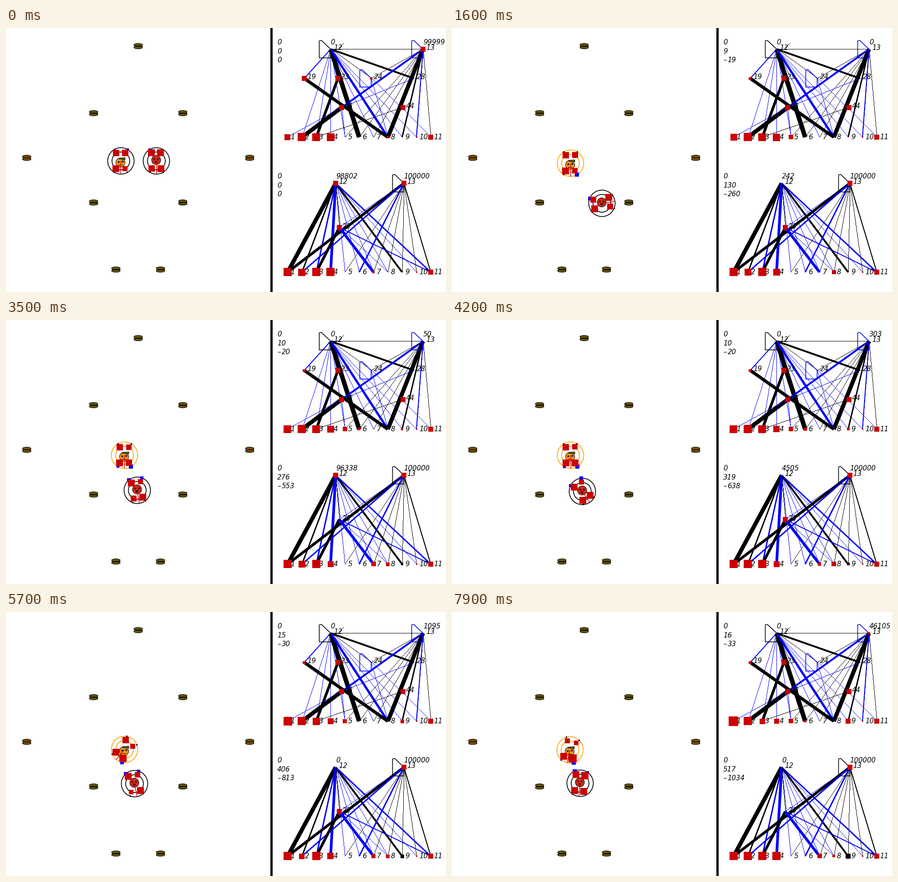
Animation of 967x579 px, one loop 8 s. Source, as a matplotlib script:

```python
import numpy as np
import matplotlib.pyplot as plt
from matplotlib.animation import FuncAnimation
from matplotlib.patches import Circle, Ellipse, Polygon, Rectangle

W, H, DPI = 967, 579, 64
PT = 72 / DPI
RED, BLUE, ORANGE, OLIVE = "#cc0000", "#0000ff", "#ffa500", "#665500"

plt.rcParams["font.family"] = "DejaVu Sans"

fig = plt.figure(figsize=(W / DPI, H / DPI), dpi=DPI, facecolor="white")
ax = fig.add_axes([0, 0, 1, 1])
ax.set_xlim(0, W)
ax.set_ylim(H, 0)
ax.axis("off")

moving = []


def shape(patch, z):
    patch.set_zorder(z)
    return ax.add_patch(patch)


def line(x0, y0, x1, y1, color, width, z=2):
    return ax.plot([x0 + 0.5, x1 + 0.5], [y0 + 0.5, y1 + 0.5], color=color,
                   lw=width * PT, zorder=z, solid_capstyle="butt")[0]


def hairline(x0, y0, x1, y1, color, z=2):
    """A crisp line, one pixel wide, without smoothing."""
    n = int(max(abs(x1 - x0), abs(y1 - y0))) + 1
    xs, ys = np.linspace(x0, x1, n), np.linspace(y0, y1, n)
    return ax.plot(np.floor(xs) + 0.5, np.floor(ys) + 0.5, ",", color=color, zorder=z)[0]


def write(x, y, s):
    return ax.text(x, y, s, fontsize=15 * PT, style="italic", zorder=4,
                   va="baseline", ha="left")


# ---------- static scene ----------
def burger(x, y):
    for dy in (3.5, -2):
        shape(Ellipse((x + 0.5, y + dy), 19, 6.5, fc=OLIVE, ec="black", lw=PT), 2)
    line(x - 9, y, x + 9, y, "black", 2, 3)
    if y == 284:
        line(x - 7, y, x + 7, y, RED, 1, 3)


for dx, dy in [(0, -245), (98, -98), (245, 0), (98, 98), (49, 245)]:
    for side in {dx, -dx}:
        burger(290 + side, 284 + dy)
shape(Rectangle((581, 0), 5, H, color="black", lw=0), 2)


def row(y):
    return {n: (618.5 + 31.45 * (n - 1), y) for n in range(1, 12)}


TOP = row(239) | {12: (713, 46), 13: (916, 46), 19: (655, 110), 23: (729, 110),
                  24: (802, 110), 28: (896, 110), 43: (737, 174), 44: (872, 174)}
LOW = row(535) | {12: (724, 340), 13: (874, 340), 23: (732, 437)}

# start node: {end node: width}; a negative width is a blue link
TOP_LINKS = {12: {13: 1, 28: 4, 19: -2, 23: -4, 24: 1, 6: 10, 8: -5},
             13: {8: 9, 43: -4, 9: 3, 10: -2, 24: 1},
             19: {8: 7}, 23: {3: 6}, 24: {11: -1, 8: -1}, 28: {43: -1},
             43: {2: 9, 1: -1, 5: -1}, 44: {3: 1}}
LOW_LINKS = {12: {1: 9, 2: 3, 3: -3, 4: -6, 9: 4, 11: -3, 23: 1},
             13: {1: 6, 2: -3, 6: -3, 11: 2, 23: -1},
             23: {3: 6, 7: -6, 8: -1, 11: -2}}


def network(nodes, links, first):
    def link(a, b, w):
        color = BLUE if w < 0 else "black"
        ends = (*nodes[a], *nodes[b])
        if abs(w) == 1:
            hairline(*ends, color)
        else:
            line(*ends, color, abs(w))

    # both outputs reach most inputs through faint links
    for n in range(first, 11):
        link(12, n, -1)
    for n in range(5, 12):
        link(13, n, 1)
    for a, ends in links.items():
        for b, w in ends.items():
            link(a, b, w)
    for n, (x, y) in nodes.items():
        write(x + 7, y + (5 if n < 12 else 2.5), str(n))


def loop(x, y, color):
    pts = [(x, y), (x, y + 19), (x - 25, y + 19), (x - 25, y - 18),
           (x - 23, y - 19), (x - 20, y - 19)]
    shape(Polygon(np.array(pts) + 0.5, fill=False, ec=color, lw=1.6 * PT), 2)


network(TOP, TOP_LINKS, 2)
network(LOW, LOW_LINKS, 5)
for spot, color in [(TOP[12], "black"), (TOP[13], BLUE), (TOP[24], BLUE), (LOW[13], "black")]:
    loop(*spot, color)
hairline(731, 43, 741, 33, "black")

# ---------- motion ----------
KEYS = [0.2, 1.6, 3.5, 4.9, 5.7, 7.0, 7.9]


def glide(t, values, keys=KEYS):
    return float(np.interp(t, keys, values))


def ramp(t, start, end):
    return float(np.clip((t - start) / (end - start), 0, 1))


def pulse(t, peak, width):
    return np.exp(-((t - peak) / width) ** 2)


def sensors(pos, heading, other):
    """Inputs 5 to 8 grow the more directly they face the other creature."""
    aim = np.arctan2(other[1] - pos[1], other[0] - pos[0])
    facing = np.cos(np.radians(heading + np.array([-30, 30, 150, 210])) - aim)
    return {5 + k: 10.3 * c if c > 0.5 else 0 for k, c in enumerate(facing)}


def add(artist):
    moving.append(artist)


def square(x, y, size, color, z):
    size = round(size)
    if size >= 2:
        corner = round(x + 0.5 - size / 2), round(y + 0.5 - size / 2)
        add(shape(Rectangle(corner, size, size, color=color, lw=0), z))


def count(x, y, v):
    if v < 0:
        add(write(x, y, "\u2013"))
        x += 9.5
    add(write(x, y, str(abs(v))))


def pumpkin(x, y):
    add(shape(Circle((x, y), 10, fc="#f59a12", ec="black", lw=PT), 5))
    brim = np.array([(-4, -8), (2, -10), (10, -11), (11, -7), (6, -6), (2, -7)])
    add(shape(Polygon(brim + (x, y), fc="#5c5a10", ec="black", lw=0.8 * PT), 6))
    for dx, dy in ((-4, -1), (5, -2)):
        add(shape(Circle((x + dx, y + dy), 1.7, fc="#3030c0", ec="black", lw=0.8 * PT), 6))
    add(line(x - 5, y + 4, x + 4, y + 4, "black", 1, 6))


def tomato(x, y):
    add(shape(Circle((x, y), 10, fc="#d02a1c", ec="black", lw=PT), 5))
    for dx in (-4, 4):
        add(shape(Circle((x + dx, y - 2), 1.5, fc="#701010", ec="black", lw=0.8 * PT), 6))
    add(shape(Ellipse((x, y + 4), 5, 4, fc="#401010", ec="black", lw=0.8 * PT), 6))


def creature(x, y, heading, color, size):
    for r in (29, 19.5):
        add(shape(Circle((x + 0.5, y + 0.5), r, fill=False, ec=color, lw=1.7 * PT), 4))
    a = np.radians(heading)
    add(line(x, y, x + 29 * np.cos(a), y + 29 * np.sin(a), RED, 1.5, 7))
    for k, turn in enumerate((-30, 30, 150, 210)):
        a = np.radians(heading + turn)
        dx, dy = np.cos(a), np.sin(a)
        sense = size[5 + k]
        if sense:
            square(x + 29 * dx, y + 29 * dy, 0.85 * sense, BLUE, 8)
        else:
            square(x + 29 * dx, y + 29 * dy, 3, "black", 8)
        square(x - 0.5 + 20 * dx, y - 0.5 + 20 * dy, 0.85 * size[k + 1], RED, 9)


def draw(i):
    while moving:
        moving.pop().remove()
    t = max(i, 2) / 10
    if i in (48, 63):  # short pauses
        t -= 0.1
    start = 1 - ramp(t, 0.2, 1.1)

    # positions and headings
    shift = ramp(t, 4.8, 5.7)
    orange = (260 - 8 * start - ramp(t, 5.7, 7), 296 - 5 * start + 5 * shift + ramp(t, 5.7, 7))
    red = (glide(t, [330, 329, 288, 284, 282, 282, 281]),
           glide(t, [291, 384, 373, 378, 376, 378, 375]))
    orange_turn = glide(t, [91, 90, 91, 86, 130, 118, 103])
    red_turn = glide(t, [89, -8, 81, 31, 79, 46, 95])

    # output values
    rise = np.expm1(glide(t, np.log1p([0, 50, 1812, 1095, 1100, 46105]),
                          [2, 3.5, 4.9, 5.7, 7.2, 7.9]))
    score = round(99999 * pulse(t, 0.2, 0.25) + rise)
    drive = int(98802 * pulse(t, 0.2, 0.571) + 96338 * pulse(t, 3.5, 0.4))

    # node sizes
    rest = abs((t - 1.3) % 4.4 - 2.2) < 0.3
    shared = {9: 1.4 * t, 10: 3, 11: 11}
    top = shared | sensors(orange, orange_turn, red) | {
        1: 13 + 1.05 * t, 2: 17.5, 3: 17 - 5 * (t / 8) ** 6, 4: 17 - 0.7 * t,
        13: 11 * score / 1e5, 19: 6 + 5 * start, 23: 11, 24: 5 * start, 43: 11, 44: 11}
    low = shared | sensors(red, red_turn, orange) | {
        1: 18, 2: 14.5 + 3.5 * np.cos(2 * np.pi * (t - 4.3) / 3.5), 3: 17.7,
        4: 13 + 0.35 * (t - 4) ** 2,
        12: 11 * drive / 1e5, 13: 11, 23: 0 if rest else 11}

    creature(*orange, orange_turn, ORANGE if i > 2 else "black", top)
    pumpkin(orange[0] - 0.5, orange[1] + 4)
    creature(*red, red_turn, "black", low)
    tomato(red[0], red[1] - 1.5)

    for nodes, size in ((TOP, top), (LOW, low)):
        for n, s in size.items():
            dark = nodes is LOW and n == 9
            square(*nodes[n], s, "black" if dark else RED, 5)

    a = 9.5 * (1 - start) + 0.5 * ramp(t, 2, 2.9) + 5 * shift + 1.5 * ramp(t, 5.7, 7.9)
    b = glide(t, [0, 130.2, 276.5, 361.5, 406.5, 472.2, 517.2])
    for y, v in ((36, a), (330, b)):
        count(596, y, 0)
        count(596, y + 20, int(v))
        count(596, y + 39, -int(2 * v))
    count(713, 36, 0)
    count(917, 36, score)
    count(725, 330, drive)
    count(874, 330, 100000)
    return moving


anim = FuncAnimation(fig, draw, frames=80, interval=100, repeat=True,
                     repeat_delay=0, init_func=lambda: draw(0), blit=False)
plt.show()
```
